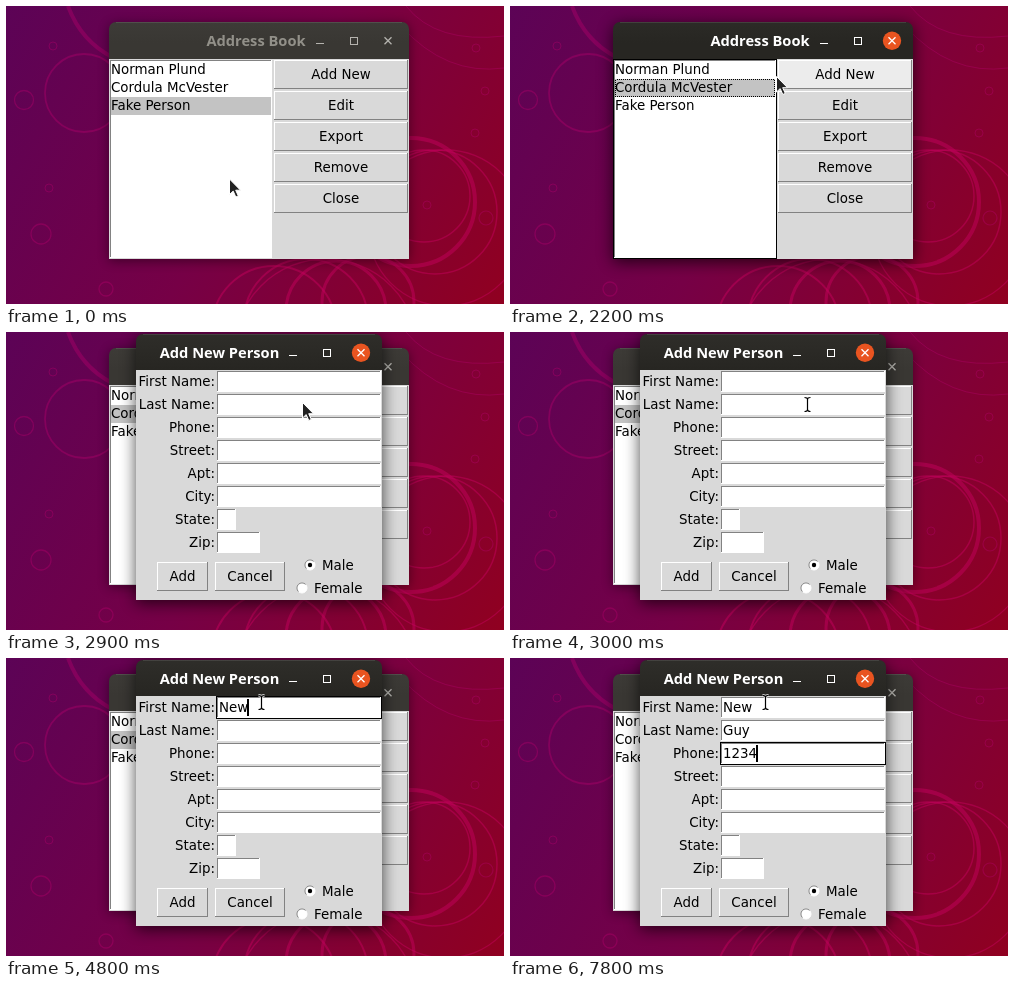
An HTML page for the animation above (8000 ms loop, 498 by 298 pixels).

```html
<!DOCTYPE html>
<html lang="en">
<head>
<meta charset="utf-8">
<title>Address Book</title>
<style>
html, body { margin: 0; width: 100%; height: 100%; overflow: hidden; background: #6f0045; }
svg { display: block; width: 498px; height: 298px; }
text { font: 13.4px "DejaVu Sans", sans-serif; fill: #000; white-space: pre; }
.title { font: bold 14.67px "Noto Sans", "Open Sans", sans-serif; text-anchor: middle; }
.mid { text-anchor: middle; }
.end { text-anchor: end; }
rect { shape-rendering: crispEdges; }
</style>
</head>
<body>
<svg id="stage" viewBox="0 0 498 298" xmlns="http://www.w3.org/2000/svg"></svg>
<script>
const LOOP = 8000;
const GREY = '#d9d9d9', DARK = '#828282';

// ---- drawing helpers ----
const rect = (x, y, w, h, fill, extra = '') =>
  `<rect x="${x}" y="${y}" width="${w}" height="${h}" fill="${fill}" ${extra}/>`;
const text = (x, y, s, cls = '', id = '') =>
  `<text x="${x}" y="${y}" class="${cls}" ${id && `id="${id}"`}>${s}</text>`;
const ring = (x, y, w, h, id, extra = '') =>
  rect(x + .5, y + .5, w - 1, h - 1, 'none', `id="${id}" stroke="#000" ${extra}`);
const circle = (x, y, r, extra = '') => `<circle cx="${x}" cy="${y}" r="${r}" ${extra}/>`;

// One pixel bevel: light from the top left, or reversed for sunken boxes.
function bevel(x, y, w, h, fill, sunken, id = '') {
  const [a, b] = sunken ? [DARK, '#fff'] : ['#fff', DARK];
  return rect(x, y, w, h, b) + rect(x, y, w - 1, h - 1, a) +
    rect(x + 1, y + 1, w - 2, h - 2, fill, id && `id="${id}"`);
}

const button = (x, y, w, h, label, id) =>
  bevel(x, y, w, h, GREY, false, id) + text(x + w / 2, Math.round(y + h / 2 + 4.3), label, 'mid');

const entry = (y, w, id) =>
  bevel(211, y + 1, w - 2, 21, '#fff', true) + ring(210, y, w, 23, id);

const frameShape = (x, y, w, h) =>
  `M${x} ${y + h}V${y + 7}a7 7 0 0 1 7-7h${w - 14}a7 7 0 0 1 7 7V${y + h}z`;

function titleBar(x, y, w, h, cx, label, on) {
  const r = x + w, cy = y + 18.7, ink = on ? '#fff' : '#b5b3ae';
  return `<path d="${frameShape(x, y, w, h)}" fill="url(#${on ? 'barOn' : 'barOff'})"/>` +
    `<path d="M${x + 7} ${y + .5}H${r - 7}" stroke="#fff" stroke-opacity=".1"/>` +
    `<text x="${cx}" y="${y + 24}" class="title" style="fill:${on ? '#fff' : '#929089'}">${label}</text>` +
    rect(r - 93, y + 21, 8, 1, ink) +
    rect(r - 58.5, y + 15.5, 7, 7, 'none', `stroke="${ink}"`) +
    (on ? circle(r - 21, cy, 9.2, 'fill="#e95420"') : '') +
    `<path d="M${r - 24.5} ${cy - 3.5}l7 7m0-7l-7 7" stroke="${ink}" stroke-width="1.3"/>`;
}

const shadow = (x, y, w, h, on) =>
  `<path d="${frameShape(x, y, w, h)}" fill="#000" opacity="${on ? .7 : .45}"
    transform="translate(0 ${on ? 3 : 2})" filter="url(#${on ? 'blurOn' : 'blurOff'})"/>`;

// ---- wallpaper ----
const bubbles = list => list.map(([x, y, r, w]) => circle(x, y, r, `stroke-width="${w}"`)).join('');

const faint = bubbles([
  [78, 87, 39, 1.8], [18, 94, 9.5, 1.3], [47, 40, 4, 1], [35, 228, 10, 1.3], [43, 182, 4, 1],
  [100, 283, 7, 1.3], [470, 42, 4, 1], [479, 85, 4, 1], [469, 127, 4, 1], [480, 212, 7, 1.2],
  [421, 199, 4, 1]
]);
const swirls = bubbles([
  [405, 196, 64, 4], [429, 206, 62, 1.5], [418, 190, 46, 1.5], [440, 222, 78, 1.3],
  [330, 305, 50, 3], [300, 315, 62, 2], [362, 296, 46, 3], [268, 322, 62, 2], [320, 345, 92, 1.4]
]);

const wallpaper = rect(0, 0, 498, 298, 'url(#sky)') +
  `<g fill="none" stroke="#b4006c">
    <g stroke-opacity=".4">${faint}
      <path d="M395 20Q440 70 498 62M400 0Q430 38 498 30"/>
      <path d="M62 0C70 22 84 40 108 52" stroke-width="4"/>
    </g>
    <g stroke="#c4005c" stroke-opacity=".5">${swirls}</g>
  </g>`;

// ---- main window ----
const people = ['Norman Plund', 'Cordula McVester', 'Fake Person'];
const actions = ['Add New', 'Edit', 'Export', 'Remove', 'Close'];
const box = [103, 16, 300, 237];

const mainWindow =
  ['Off', 'On'].map((s, i) => `<g id="main${s}">${shadow(...box, i)}
    ${titleBar(...box, 250, 'Address Book', i)}</g>`).join('') +
  rect(103, 53, 300, 200, GREY) +
  bevel(104, 54, 162, 198, '#fff', true) +
  ring(103, 53, 164, 200, 'listRing') +
  rect(105, 0, 160, 18, '#c3c3c3', 'id="sel"') +
  ring(105, 0, 160, 18, 'dots', 'stroke-dasharray="1 1" stroke-dashoffset="1"') +
  people.map((p, i) => text(105, 68 + 18 * i, p)).join('') +
  actions.map((a, i) => button(268, 54 + 31 * i, 134, 29, a, 'act' + i)).join('');

// ---- dialog ----
const fields = ['First Name', 'Last Name', 'Phone', 'Street', 'Apt', 'City', 'State', 'Zip'];
const fieldWidth = i => i === 6 ? 21 : i === 7 ? 45 : 166;
const dlg = [130, 2, 246, 266];

const radio = (x, y, label, on) =>
  circle(x, y, 5, `fill="#fff" stroke="#fff"`) +
  `<path d="M${x - 3.6} ${y + 3.6}a5 5 0 1 1 7.2-7.2" fill="none" stroke="${DARK}"/>` +
  (on ? circle(x, y, 2.2) : '') + text(x + 12, y + 5, label);

const dialog = `<g id="dialog">${shadow(...dlg, true)}
  ${titleBar(...dlg, 213.5, 'Add New Person', true)}
  ${rect(130, 38, 246, 230, GREY)}
  ${fields.map((f, i) => text(209, 54 + 23 * i, f + ':', 'end') +
    entry(38 + 23 * i, fieldWidth(i), 'ring' + i)).join('')}
  ${[0, 1, 2].map(i => text(213, 54 + 23 * i, '', '', 'val' + i)).join('')}
  ${rect(0, 0, 2, 17, '#000', 'id="caret"')}
  ${button(151, 230, 51, 29, 'Add')}${button(209, 230, 70, 29, 'Cancel')}
  ${radio(304, 233, 'Male', true)}${radio(296, 256, 'Female', false)}</g>`;

// ---- pointers ----
const ibeam = 'M-3-7Q0-7 0-5Q0-7 3-7M0-5V5M-3 7Q0 7 0 5Q0 7 3 7';
const pointers = `<path id="arrow" d="M0 0V15.5L3.7 12.1 6.3 18 8.8 16.9 6.2 11.2H11Z"
    fill="#222" stroke="#fff" stroke-width="1" stroke-linejoin="round"/>
  <g id="beam" fill="none"><path d="${ibeam}" stroke="#fff" stroke-width="3" opacity=".8"/>
    <path d="${ibeam}" stroke="#000" stroke-width="1.2"/></g>`;

const gradient = (id, a, b) => `<linearGradient id="${id}" x2="0" y2="37" gradientUnits="userSpaceOnUse">
  <stop stop-color="${a}"/><stop offset="1" stop-color="${b}"/></linearGradient>`;
const blur = (id, d) => `<filter id="${id}" x="-20%" y="-20%" width="140%" height="140%">
  <feGaussianBlur stdDeviation="${d}"/></filter>`;

const stage = document.getElementById('stage');
stage.innerHTML = `<defs>
  <linearGradient id="sky" x1="0" y1="0" x2="498" y2="298" gradientUnits="userSpaceOnUse">
    <stop stop-color="#5c0356"/><stop offset=".5" stop-color="#760046"/><stop offset="1" stop-color="#900020"/>
  </linearGradient>
  ${gradient('barOn', '#2f2e2a', '#272622')}${gradient('barOff', '#403e3a', '#393733')}
  ${blur('blurOn', 8)}${blur('blurOff', 6)}</defs>` +
  wallpaper + mainWindow + dialog + pointers;

// ---- timeline ----
const $ = id => document.getElementById(id);
const show = (id, on) => $(id).setAttribute('visibility', on ? 'inherit' : 'hidden');
const move = (id, x, y) => $(id).setAttribute('transform', `translate(${x} ${y})`);

// Pointer keys: time, x, y. Moves advance in 100 ms steps, holds repeat a place.
const arrowPath = [
  [0, 223.5, 173], [700, 223.5, 173], [900, 208, 119], [1100, 193.5, 70.5], [1400, 193.5, 70.5],
  [1500, 203.5, 70.5], [1600, 203.5, 70.5], [1700, 193, 70.5], [1800, 193, 70.5],
  [2200, 266.5, 70.5], [2400, 287, 70.5], [2600, 296.5, 70.5]
];
const beamPath = [[3000, 297.5, 72.5], [3100, 297.5, 72.5], [3400, 255.5, 44.5]];

// Typing keys: time, text.
const typed = [
  [[4400, 'N'], [4700, 'Ne'], [4800, 'New']],
  [[5700, 'G'], [5800, 'Gu'], [5900, 'Guy']],
  [[7200, '1'], [7400, '12'], [7600, '123'], [7800, '1234']]
];
const focusTimes = [4000, 5100, 6500];
const caretOff = [[4000, 4100], [4500, 4700], [6500, 6600], [7500, 7600]];

function along(path, t) {
  const i = path.findIndex(k => k[0] > t);
  if (i < 0) return path[path.length - 1].slice(1);
  if (i === 0) return path[0].slice(1);
  const [a, b] = [path[i - 1], path[i]];
  const f = (t - a[0]) / (b[0] - a[0]);
  return [1, 2].map(n => a[n] + (b[n] - a[n]) * f);
}

const latest = (keys, t) => keys.reduce((v, k) => t >= k[0] ? k[1] : v, '');
const within = (t, a, b) => t >= a && t < b;

function render(time) {
  const t = Math.floor(time / 100) * 100;

  const active = within(t, 1500, 2900);
  show('mainOn', active);
  show('mainOff', !active);

  const listFocus = within(t, 1400, 2800);
  const rowY = t < 1500 ? 91 : 73;
  show('listRing', listFocus);
  show('dots', listFocus);
  show('sel', t < 5100);
  $('sel').setAttribute('y', rowY);
  $('dots').setAttribute('y', rowY + .5);
  $('act0').setAttribute('fill', within(t, 2200, 2800) ? '#ececec' : GREY);

  show('dialog', t >= 2900);
  const focus = focusTimes.filter(f => t >= f).length - 1;
  fields.forEach((_, i) => show('ring' + i, i === focus));
  typed.forEach((keys, i) => { $('val' + i).textContent = latest(keys, t); });

  const caretOn = focus >= 0 && !caretOff.some(([a, b]) => within(t, a, b));
  show('caret', caretOn);
  if (caretOn) {
    const width = $('val' + focus).getComputedTextLength();
    move('caret', Math.round(212 + width), 41 + 23 * focus);
  }

  show('arrow', t < 3000);
  show('beam', t >= 3000);
  move('arrow', ...along(arrowPath, t));
  move('beam', ...along(beamPath, t));
}

const start = performance.now();
function tick() {
  render((performance.now() - start) % LOOP);
  requestAnimationFrame(tick);
}
tick();
</script>
</body>
</html>
```
